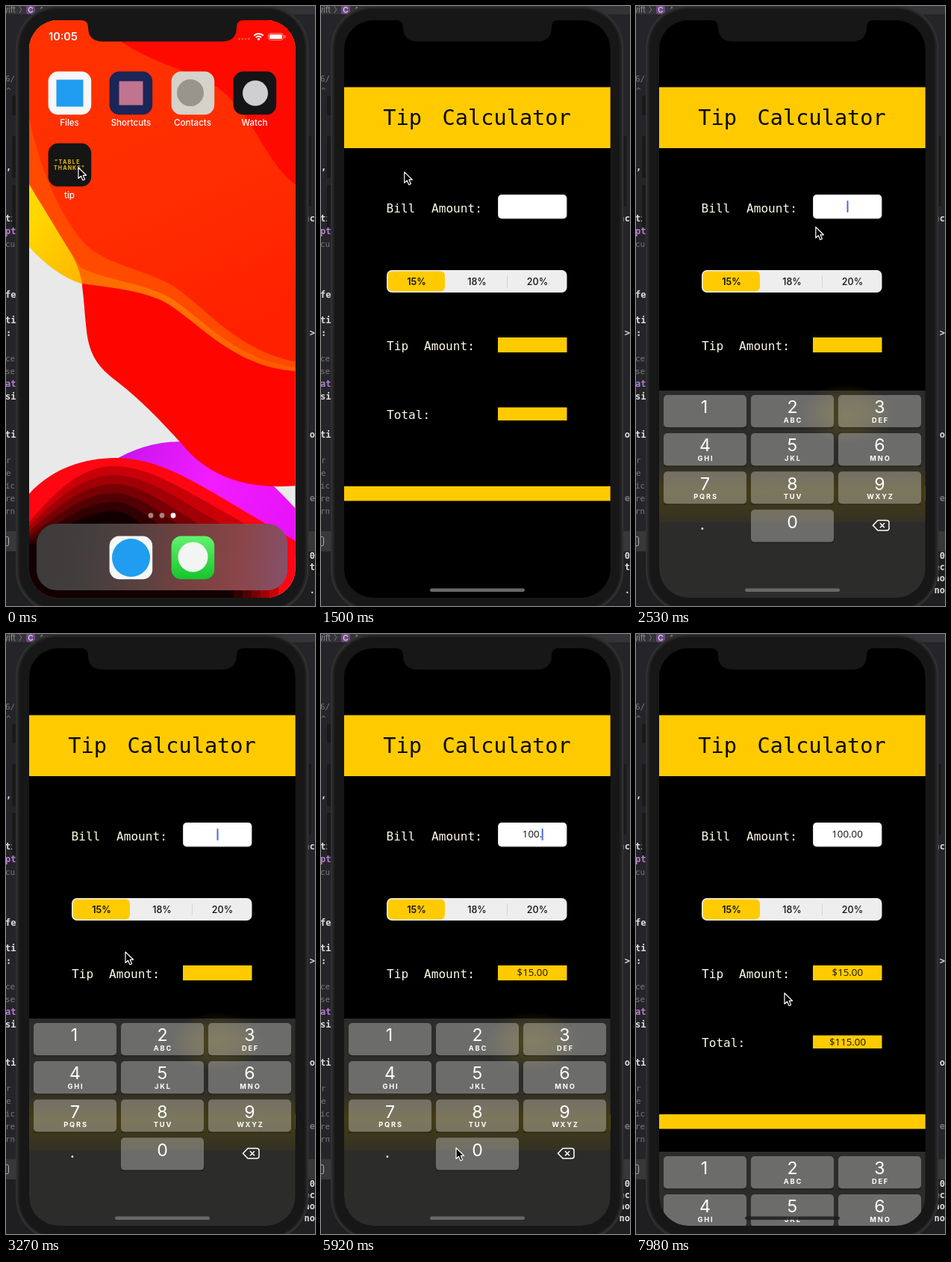
An HTML page with a canvas for the animation above (8000 ms loop, 414 by 802 pixels).

```html
<!DOCTYPE html>
<html lang="en">
<head>
<meta charset="utf-8">
<title>Tip calculator</title>
<style>
html, body { margin: 0; width: 100%; height: 100%; overflow: hidden; background: #252528; }
canvas { display: block; width: 414px; height: 802px; }
</style>
</head>
<body>
<canvas id="stage" width="414" height="802"></canvas>
<script>
const ctx = document.getElementById('stage').getContext('2d');
const LOOP = 8000, STEP = 147.3, START = 1350;
const YELLOW = '#ffcb00';
const UI = 'Inter, Roboto, sans-serif';
const MONO = '"DejaVu Sans Mono", monospace';
const FIELD = '"Open Sans", "Noto Sans", sans-serif';

// time, x, y of the pointer tip
const POINTER = [
  [1340, 97, 216], [1500, 112, 222], [1790, 225, 258], [1945, 258, 264], [2390, 258, 264],
  [2680, 222, 330], [2975, 163, 415], [3200, 163, 415], [3265, 160, 425], [3560, 98, 520],
  [3710, 88, 535], [3860, 88, 535], [4150, 150, 655], [4300, 178, 699], [4440, 181, 705],
  [4890, 181, 705], [5190, 105, 699], [5330, 63, 692], [5480, 81, 690], [5630, 84, 690],
  [5910, 181, 687], [6500, 181, 687], [6650, 186, 687], [7090, 186, 687], [7250, 187, 655],
  [7400, 192, 570], [7550, 198, 495], [7680, 199, 480], [8000, 199, 480]
];
const TYPED = [[3840, '1'], [4570, '10'], [4870, '100'], [5460, '100.'], [6050, '100.0'], [6340, '100.00']];
const PRESSES = [[3700, 3840, 0], [4570, 4700, 10], [4870, 5000, 10], [6050, 6180, 10], [6340, 6470, 10]];
const KEYBOARD = [[2090, 288], [2234, 166], [2381, 23], [2525, 0], [7840, 0], [7978, 178]];
const KEYS = [['1', ''], ['2', 'ABC'], ['3', 'DEF'], ['4', 'GHI'], ['5', 'JKL'], ['6', 'MNO'],
  ['7', 'PQRS'], ['8', 'TUV'], ['9', 'WXYZ'], ['.', ''], ['0', '']];

function track(keys, t, i = 1) {
  if (t <= keys[0][0]) return keys[0][i];
  for (let k = 1; k < keys.length; k++) {
    const a = keys[k - 1], b = keys[k];
    if (t <= b[0]) return a[i] + (b[i] - a[i]) * (t - a[0]) / (b[0] - a[0]);
  }
  return keys[keys.length - 1][i];
}

function rect(x, y, w, h, fill) {
  ctx.fillStyle = fill;
  ctx.fillRect(x, y, w, h);
}

function round(x, y, w, h, r, fill) {
  ctx.beginPath();
  ctx.roundRect(x, y, w, h, r);
  if (fill) { ctx.fillStyle = fill; ctx.fill(); }
}

function circle(x, y, r, fill) {
  ctx.beginPath();
  ctx.arc(x, y, r, 0, 7);
  ctx.fillStyle = fill;
  ctx.fill();
}

function text(str, x, y, font, fill, align = 'left', spacing = 0) {
  ctx.font = font;
  ctx.fillStyle = fill;
  ctx.textAlign = align;
  ctx.letterSpacing = spacing + 'px';
  ctx.fillText(str, x, y);
}

function shape(d, fill, stroke, width) {
  const p = new Path2D(d);
  if (fill) { ctx.fillStyle = fill; ctx.fill(p); }
  if (stroke) { ctx.strokeStyle = stroke; ctx.lineWidth = width; ctx.stroke(p); }
}

function gradient(x0, y0, x1, y1, ...stops) {
  const g = ctx.createLinearGradient(x0, y0, x1, y1);
  stops.forEach((c, i) => g.addColorStop(i / (stops.length - 1), c));
  return g;
}

function drawEditor(t) {
  rect(0, 0, 414, 802, '#252428');
  rect(0, 0, 414, 11, '#343338');
  rect(0, 702, 414, 27, '#38383a');
  rect(0, 729, 414, 73, '#1f1f22');
  const code = '600 12px ' + MONO, plain = '11px ' + MONO;
  text('wift', -6, 9, '11px ' + UI, '#8b8b90');
  text('\u3009', 17, 9, '10px "Noto Sans CJK SC", sans-serif', '#8b8b90');
  round(27, -1, 12, 12, 3, '#6d4b80');
  text('C', 33, 9, '600 10px ' + UI, '#e3c9ee', 'center');
  text('A', 44, 9, '11px ' + UI, '#8b8b90');
  const white = '#dededf', grey = '#77777d', purple = '#b47fd0';
  const left = [['6/', 101, grey], ['^', 117, grey], [',', 219, white], ['ti', 288, white],
    ['pt', 305, purple], ['cu', 322, grey], ['fe', 390, white], ['ti', 424, white], [':', 441, white],
    ['ce', 475, grey], ['se', 492, grey], ['at', 509, purple], ['si', 526, white], ['ti', 577, white],
    ['r', 611, grey], ['e', 628, grey], ['ic', 645, grey], ['re', 662, grey], ['rn', 679, grey]];
  for (const [s, y, c] of left) text(s, s.length > 1 ? -1 : 0, y, c === grey ? plain : code, c);
  const right = [['nc', 288, white], ['>', 441, white], ['o', 577, white], ['e', 662, grey], ['0', 739, white]]
    .concat(t < 2070 ? [['t', 754, white], ['.', 785, white]]
                     : [['ec', 754, white], ['no', 769, white], ['no', 785, white]]);
  for (const [s, y, c] of right) text(s, 414, y, code, c, 'right');
  ctx.strokeStyle = '#b0b0b2';
  ctx.lineWidth = 1;
  round(-6.5, 709.5, 10, 12, 2);
  ctx.stroke();
}

function drawBody() {
  for (const [x, y, h] of [[8, 120, 26], [8, 174, 56], [8, 239, 57], [403, 174, 94]])
    round(x, y, 6, h, 2, '#19191a');
  round(13, -1, 392.5, 812, 57, '#303031');
  round(15.5, 2, 387.5, 806, 54, '#222223');
  round(18, 4, 382.5, 802, 51, '#171718');
}

function drawWallpaper() {
  rect(31, 19, 358, 773, '#e9e9ea');
  // magenta and dark lobes
  shape('M140 610C190 580 240 574 290 594C330 610 362 644 390 674V735H200Z',
    gradient(150, 600, 388, 690, '#c615ee', '#f21cff', '#e812fa'));
  shape('M31 652C62 618 105 604 148 604C220 606 265 646 390 716V792H31Z', '#ff0612');
  const tones = ['#c80008', '#a00006', '#780004', '#520003', '#300002', '#120001'];
  tones.forEach((tone, i) => {
    const d = i * 12;
    shape(`M31 ${690 + d * .5}C65 ${650 + d} 100 ${615 + d} 145 ${615 + d}` +
      `C${205 - d * .4} ${617 + d} ${250 - d} ${656 + d} ${365 - d} ${716 + d}L${365 - d} 792H31Z`, tone);
  });
  // upper waves
  shape('M31 19H390V641C320 648 268 626 236 586C205 552 180 526 150 503C122 482 112 466 108 435' +
    'C104 400 104 370 95 338L31 235Z', '#ff0500');
  shape('M31 225C55 265 80 310 95 338C100 352 102 362 103 372C75 363 52 345 31 322Z',
    gradient(31, 290, 102, 350, '#ffd800', '#ffba00'));
  shape('M31 19H390V488C300 484 250 412 205 392C170 378 135 376 102 371C96 330 60 290 31 238Z',
    gradient(100, 330, 350, 480, '#ff6a00', '#ff7200', '#ff5c00'));
  shape('M31 19H390V483C300 474 254 404 208 384C170 368 135 366 100 350C80 320 60 285 31 238Z', '#ff4a00');
  shape('M31 19H390V476C306 460 264 398 220 372C180 350 130 345 103 315C76 282 48 230 31 150Z',
    gradient(150, 100, 300, 440, '#ff3100', '#ff2c00', '#ff2000'));
  shape('M126 19C155 62 215 76 268 100C328 128 346 212 390 240V19Z', '#ff0a00');
}

function drawTile(x, y, fill, mark, side) {
  round(x - .4, y - .4, 57.6, 57.6, 13, fill);
  if (mark) rect(x + 28.5 - side / 2, y + 28.5 - side / 2, side, side, mark);
}

function drawHome() {
  drawWallpaper();
  text('10:05', 57, 46, '600 14.5px ' + UI, '#fff');
  for (let i = 0; i < 4; i++) circle(312.5 + i * 4.3, 44, 1.2, 'rgba(255,255,255,.35)');
  ctx.strokeStyle = '#fff';
  ctx.lineWidth = 2;
  for (const r of [8.5, 5]) {
    ctx.beginPath();
    ctx.arc(338.5, 45.5, r, -Math.PI * .76, -Math.PI * .24);
    ctx.stroke();
  }
  circle(338.5, 44.3, 1.6, '#fff');
  ctx.strokeStyle = 'rgba(255,255,255,.5)';
  ctx.lineWidth = 1;
  round(351.5, 36.5, 20, 9, 3);
  ctx.stroke();
  round(353, 38, 17, 6, 1.5, '#fff');
  round(373, 39, 1.5, 4, 1, 'rgba(255,255,255,.6)');

  drawTile(57, 88, '#f6f7f9', '#209cf0', 36);
  drawTile(139, 88, '#1b2557', '#c0748f', 32);
  drawTile(222, 88, '#d5d2c9');
  circle(247, 116, 18, '#99958d');
  drawTile(305, 88, '#141416');
  circle(334, 116.5, 17, '#cfcfd1');
  drawTile(57, 184, '#151516');
  const labels = [['Files', 85, 160], ['Shortcuts', 167.5, 160], ['Contacts', 250, 160],
    ['Watch', 333, 160], ['tip', 85, 257]];
  for (const [s, x, y] of labels) text(s, x, y, '500 11.6px ' + UI, '#fff', 'center');
  const tag = '800 7px ' + UI;
  text('"TABLE', 65, 211, tag, '#d9ad08', 'left', 1.4);
  text('THANKS"', 64, 219, tag, '#d9ad08', 'left', 1.1);

  [194, 209, 224].forEach((x, i) => circle(x, 681, 3.4, i < 2 ? 'rgba(255,255,255,.5)' : '#fff'));
  round(41, 692, 336, 89, 27,
    gradient(41, 720, 377, 760, '#3d3b3b', '#443e3e', '#564140', '#754141', '#8a4548', '#86506a'));
  drawTile(139, 709, '#f5f6f7');
  circle(167.5, 737.5, 25.5, '#209df0');
  drawTile(222, 709, gradient(0, 709, 0, 766, '#62f26c', '#15c52d'));
  circle(250.5, 736.5, 20, '#f2f5f2');
}

function drawForm(bill, caret) {
  rect(31, 19, 357, 773, '#000');
  rect(31, 108.5, 357, 81.5, YELLOW);
  const title = '28.6px ' + MONO, label = '16.1px ' + MONO, ivory = '#fff9e8';
  text('Tip', 83.3, 159, title, '#0c0900');
  text('Calculator', 162.6, 159, title, '#0c0900');
  text('Bill', 87.5, 275.5, label, ivory);
  text('Amount:', 148, 275.5, label, ivory);
  text('Tip', 88, 459.7, label, ivory);
  text('Amount:', 138, 459.7, label, ivory);
  text('Total:', 88, 552, label, ivory);

  round(237, 252, 92.5, 32.5, 5, '#c9c9c9');
  round(237.7, 252.5, 91, 31, 4.5, '#fff');
  const font = '13.3px ' + FIELD;
  text(bill, 283, 272, font, '#111', 'center');
  if (caret) round(282.5 + ctx.measureText(bill).width / 2, 260, 2, 16, 1, '#4a6be0');

  round(88, 353, 241.5, 30, 7, '#eeeeef');
  round(89.5, 354.5, 76.5, 27, 6, YELLOW);
  rect(249, 360, 1, 16, '#d2d2d4');
  text('15%', 128, 372.8, '600 12.6px ' + UI, '#111', 'center');
  text('18%', 209, 372.8, '500 12.6px ' + UI, '#111', 'center');
  text('20%', 290, 372.8, '500 12.6px ' + UI, '#111', 'center');

  rect(237, 443, 92.5, 20, YELLOW);
  rect(237, 536.5, 92.5, 17.5, YELLOW);
  if (bill) {
    text('$' + (bill * .15).toFixed(2), 283.3, 457, font, '#1a1500', 'center');
    text('$' + (bill * 1.15).toFixed(2), 283.5, 549.5, font, '#1a1500', 'center');
  }
  rect(31, 642, 357, 19.5, YELLOW);
}

// the blurred form showing through the resting keyboard
function drawGlow() {
  ctx.save();
  rect(31, 606, 357, 84, gradient(0, 606, 0, 690, 'rgba(90,75,0,0)', 'rgba(90,75,0,.5)', 'rgba(90,75,0,.18)'));
  const glow = ctx.createRadialGradient(0, 0, 0, 0, 0, 64);
  glow.addColorStop(0, 'rgba(110,95,20,.5)');
  glow.addColorStop(.5, 'rgba(110,95,20,.34)');
  glow.addColorStop(1, 'rgba(110,95,20,0)');
  ctx.translate(283, 545);
  ctx.scale(1, .62);
  ctx.fillStyle = glow;
  ctx.fillRect(-64, -64, 128, 128);
  ctx.restore();
}

function drawKeyboard(off, pressed) {
  ctx.save();
  ctx.translate(0, off);
  rect(31, 514, 357, 290, '#2c2c2b');
  if (!off) drawGlow();
  KEYS.forEach(([digit, letters], i) => {
    const x = 37 + i % 3 * 117, y = 520 + Math.floor(i / 3) * 51.1, mid = x + 55.5;
    if (digit === '.') {
      text('.', 89, y + 27, '22px ' + UI, '#fff', 'center');
      return;
    }
    round(x, y + 43, 111, 1.5, 1, 'rgba(0,0,0,.35)');
    round(x, y, 111, 43.3, 5, i === pressed ? 'rgba(255,255,255,.12)' : 'rgba(255,255,255,.3)');
    text(digit, digit === '1' ? mid - 1 : mid, y + 24.3, '400 23.2px ' + UI, '#fff', 'center');
    if (letters) text(letters, mid + 1, y + 37, '700 9.3px ' + UI, '#fff', 'center', 1.8);
  });
  shape('M324 687.5H336Q339 687.5 339 690.5V698Q339 701 336 701H324L317.5 694.2Z' +
    'M327 691.2L333 697.2M333 691.2L327 697.2', null, '#fff', 1.5);
  ctx.restore();
}

function drawPointer(x, y) {
  ctx.save();
  ctx.translate(x, y);
  ctx.lineJoin = 'round';
  shape('M0 0V14.5L3.5 11.3L6 17L8.6 15.8L6.2 10.3H10.5Z', '#000', '#fff', 1.2);
  ctx.restore();
}

function draw(time) {
  const t = time < START - 5 ? time : START + Math.floor((time - START + 5) / STEP) * STEP;
  const typed = TYPED.filter(([at]) => t >= at).pop();
  const press = PRESSES.find(([a, b]) => t >= a && t < b);
  const off = track(KEYBOARD, t);
  const caret = t > 2080 && t < 7900 && !(t > 2660 && t < 2960) && !(t > 7230 && t < 7530);

  drawEditor(t);
  drawBody();
  ctx.save();
  round(31, 19, 356.7, 772, 39);
  ctx.clip();
  if (t < 600) drawHome();
  if (t >= 300) {
    ctx.save();
    if (t < 600) {
      rect(31, 19, 357, 773, 'rgba(0,0,0,.6)');
      ctx.translate(.1, 1.5);
      ctx.scale(.9965, .9965);
      round(31, 18, 357, 773.5, 39);
      ctx.clip();
    }
    drawForm(typed ? typed[1] : '', caret);
    if (off < 280) drawKeyboard(off, press ? press[2] : -1);
    const sliding = off > 0 && off < 280;
    round(146, 778.5, 127, 4.5, 2.2, sliding ? 'rgba(30,30,30,.85)' : '#686867');
    ctx.restore();
  }
  ctx.restore();
  shape('M100 18H319V19Q309 19 309 28Q309 47.5 289 47.5H130Q110 47.5 110 28Q110 19 100 19Z', '#171718');
  drawPointer(track(POINTER, t), track(POINTER, t, 2));
}

const began = performance.now();
function frame() {
  draw((performance.now() - began) % LOOP);
  requestAnimationFrame(frame);
}
frame();
</script>
</body>
</html>
```
